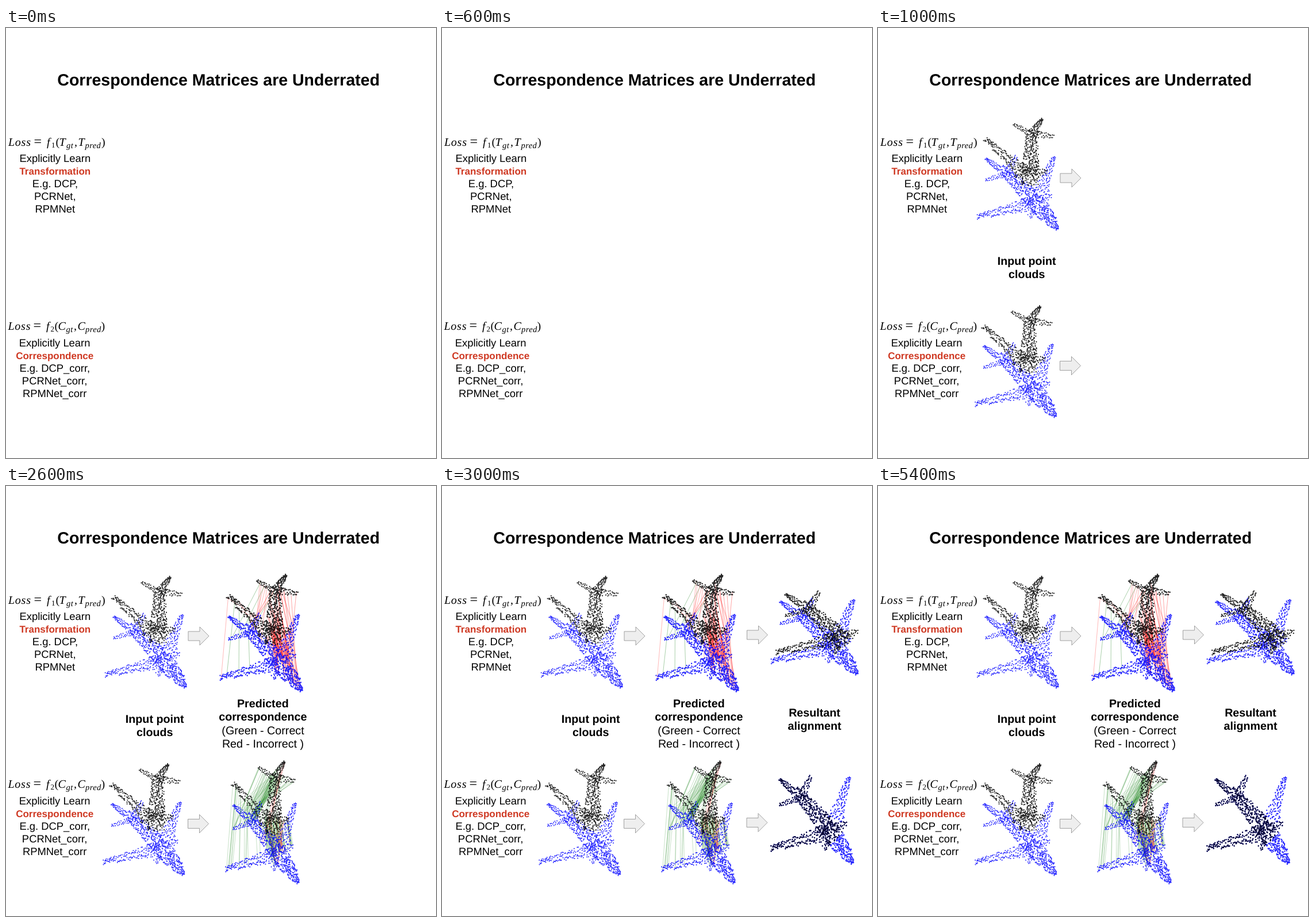
Recreate the animation shown at these times as an HTML page. Size 748 by 748 pixels, loop 7 s.

```html
<!DOCTYPE html>
<html lang="en">
<head>
<meta charset="utf-8">
<title>Correspondence Matrices are Underrated</title>
<style>
  html, body { margin: 0; height: 100%; overflow: hidden; background: #fff; }
  svg { display: block; width: 100vw; height: 100vh; }
  text {
    font-family: "Liberation Sans", Arial, sans-serif;
    font-size: 18.4px;
    text-anchor: middle;
    text-rendering: geometricPrecision;
  }
  .title { font-size: 28.5px; font-weight: bold; }
  .key { font-size: 17px; font-weight: bold; fill: #cf3a24; }
  .cap { font-size: 19.7px; }
  .b { font-weight: bold; }
  .math {
    font-family: "Liberation Serif", "Times New Roman", serif;
    font-size: 20px;
    font-style: italic;
    text-anchor: start;
  }
  .word { letter-spacing: .75px; }
  .sub { font-size: 14.5px; letter-spacing: .4px; }
  .up { font-style: normal; }
  .eq { font-size: 24px; font-style: normal; }
  .num { font-size: 13px; font-style: normal; }
  .arrow { fill: #eee; stroke: #8c8c8c; stroke-width: .8; }
  .dots { fill: none; stroke-linecap: round; stroke-opacity: .85; }
  .rays { fill: none; stroke-width: .8; }
  .stage { animation: 7s step-end infinite; }
  #inputs { animation-name: first; }
  #matches { animation-name: second; }
  #results { animation-name: third; }
  @keyframes first { 0% { opacity: 0 } 14.2857%, 100% { opacity: 1 } }
  @keyframes second { 0% { opacity: 0 } 28.5714%, 100% { opacity: 1 } }
  @keyframes third { 0% { opacity: 0 } 42.8571%, 100% { opacity: 1 } }
</style>
</head>
<body>
<svg viewBox="0 0 748 748">
  <defs><path id="arrow" class="arrow" d="M0 -8H20V-16L36 0L20 16V8H0Z"/></defs>

  <text class="title" x="369.7" y="99.5">Correspondence Matrices are Underrated</text>

  <text class="math" y="205">
    <tspan class="word" x="4">Loss</tspan><tspan class="eq" x="48.5">=</tspan>
    <tspan x="71">f</tspan><tspan class="num" x="79" dy="3">1</tspan>
    <tspan class="up" x="86.5" dy="-3">(</tspan><tspan x="92.5">T</tspan>
    <tspan class="sub" x="105" dy="3.5">gt</tspan><tspan class="up" x="119" dy="-3.5">,</tspan>
    <tspan x="125.5">T</tspan><tspan class="sub" x="137.5" dy="3.5">pred</tspan>
    <tspan class="up" x="166" dy="-3.5">)</tspan>
  </text>
  <text x="85.3" y="233.3">Explicitly Learn</text>
  <text class="key" x="85.3" y="255.2">Transformation</text>
  <text x="85.5" y="277.3">E.g. DCP,</text>
  <text x="85.3" y="299.2">PCRNet,</text>
  <text x="85.3" y="321">RPMNet</text>

  <text class="math" y="525">
    <tspan class="word" x="3.5">Loss</tspan><tspan class="eq" x="47.5">=</tspan>
    <tspan x="70">f</tspan><tspan class="num" x="77.5" dy="3">2</tspan>
    <tspan class="up" x="84.5" dy="-3">(</tspan><tspan x="90.5">C</tspan>
    <tspan class="sub" x="104.5" dy="3.5">gt</tspan><tspan class="up" x="118" dy="-3.5">,</tspan>
    <tspan x="124.5">C</tspan><tspan class="sub" x="138" dy="3.5">pred</tspan>
    <tspan class="up" x="165.5" dy="-3.5">)</tspan>
  </text>
  <text x="84.6" y="554.2">Explicitly Learn</text>
  <text class="key" x="84.7" y="576.1">Correspondence</text>
  <text x="84.8" y="598.2">E.g. DCP_corr,</text>
  <text x="84.6" y="620.1">PCRNet_corr,</text>
  <text x="84.6" y="641.8">RPMNet_corr</text>

  <g id="inputs" class="stage">
    <text class="cap b" x="258.7" y="411.7">Input point</text>
    <text class="cap b" x="258.7" y="435">clouds</text>
    <use href="#arrow" x="317" y="261"/>
    <use href="#arrow" x="316.5" y="587.5"/>
  </g>
  <g id="matches" class="stage">
    <text class="cap b" x="446.8" y="384.7">Predicted</text>
    <text class="cap b" x="446.8" y="408">correspondence</text>
    <text class="cap" x="447" y="431.7">(Green - Correct</text>
    <text class="cap" x="447" y="455">Red - Incorrect )</text>
  </g>
  <g id="results" class="stage">
    <text class="cap b" x="648" y="400.5">Resultant</text>
    <text class="cap b" x="648" y="423.8">alignment</text>
    <use href="#arrow" x="530.5" y="259"/>
    <use href="#arrow" x="530" y="585.5"/>
  </g>
</svg>
<script>
  // Joints of each plane; the black scan lacks the nose and the right wing.
  const blue = {
    tail: [187, 227], waist: [226, 253], hub: [269, 297], cut: [284, 315],
    chin: [301, 335], nose: [313, 350], finR: [240, 222], finL: [186, 265],
    rootL: [258, 308], wingL: [172, 329], podL: [264, 331],
    rootR: [283, 286], wingR: [306, 223], podR: [303, 294]
  };
  const black = {
    tail: [286, 158], waist: [268, 185], hub: [265, 248], cut: [264, 274],
    finR: [306, 188], finL: [235, 167], rootL: [248, 247], wingL: [186, 193],
    podL: [237, 257], podR: [294, 252]
  };

  // Tapered strips between joints: from, to, start width, end width, points.
  const strips = [
    ["waist", "tail", 20, 4, 75],
    ["hub", "waist", 31, 20, 210],
    ["hub", "cut", 31, 30, 95],
    ["cut", "chin", 30, 22, 115],
    ["chin", "nose", 22, 7, 55],
    ["waist", "finR", 16, 6, 36],
    ["waist", "finL", 13, 4, 36],
    ["rootL", "wingL", 23, 8, 125],
    ["rootR", "wingR", 28, 6, 105],
    ["hub", "podL", 16, 11, 34],
    ["hub", "podR", 16, 10, 36]
  ];

  let seed = 11;
  const rand = () => (seed = seed * 16807 % 2147483647) / 2147483647;

  // Even spread: stratified along the strip, golden-ratio steps across it.
  const points = {};
  for (const [from, to, w0, w1, n] of strips)
    points[to] = Array.from({ length: n }, (_, i) => {
      const u = ((i + rand()) / n) ** 1.2;
      const side = (i * .618 + rand() * .4) % 1 - .5;
      return { from, to, u, off: side * (w0 + (w1 - w0) * u) };
    });

  function at(plane, { from, to, u, off }) {
    const [x, y] = plane[from];
    const dx = plane[to][0] - x, dy = plane[to][1] - y, len = Math.hypot(dx, dy);
    return [x + dx * u + dy / len * off, y + dy * u - dx / len * off];
  }

  // A view puts the blue tail at (x, y) with its own scale.
  const view = (x, y, sx, sy) => p =>
    (x + (p[0] - 187) * sx).toFixed(1) + " " + (y + (p[1] - 227) * sy).toFixed(1);

  function draw(id, cls, d, style) {
    const path = document.createElementNS("http://www.w3.org/2000/svg", "path");
    path.setAttribute("class", cls);
    path.setAttribute("d", d);
    Object.assign(path.style, style);
    document.getElementById(id).append(path);
  }

  const shared = Object.keys(points).filter(to => black[to]);

  function cloud(id, plane, place, stroke, size, names = Object.keys(points)) {
    const dots = names.filter(to => plane[to])
      .flatMap(to => points[to].map(p => "M" + place(at(plane, p)) + "h0"));
    draw(id, "dots", dots.join(""), { stroke, strokeWidth: size });
  }

  const pick = list => list[Math.floor(rand() * list.length)];

  // Join n black points to blue ones; a strip paired with itself matches exactly.
  function rays(place, stroke, opacity, n, starts, ends) {
    let d = "";
    while (n--) {
      const p = pick(points[pick(starts)]);
      const q = ends ? pick(points[pick(ends)]) : p;
      d += "M" + place(at(black, p)) + "L" + place(at(blue, q));
    }
    draw("matches", "rays", d, { stroke, strokeOpacity: opacity });
  }

  const BLUE = "#00f", BLACK = "#000", RED = "#f22", GREEN = "#2c8a2c";

  for (const place of [view(187, 227, 1, 1), view(183.5, 553, 1, 1)]) {
    cloud("inputs", blue, place, BLUE, 2);
    cloud("inputs", black, place, BLACK, 2.2);
  }

  const wrong = view(387, 227, 1.015, 1.05);
  rays(wrong, RED, .5, 60, ["waist", "cut", "podR"], ["cut", "chin", "podR"]);
  rays(wrong, RED, .5, 16, ["waist", "finR", "tail"], ["nose", "wingR", "podR"]);
  rays(wrong, RED, .4, 16, ["wingL", "finL"], ["finR", "waist"]);
  rays(wrong, RED, .4, 2, ["wingL"]);
  rays(wrong, GREEN, .5, 6, ["finL", "wingL"]);
  cloud("matches", blue, wrong, BLUE, 2.4);
  cloud("matches", black, wrong, BLACK, 2.5);

  const right = view(395, 555, .905, 1.1);
  rays(right, GREEN, .33, 190, shared);
  rays(right, RED, .45, 16, ["cut", "podR"], ["cut", "podR"]);
  rays(right, RED, .4, 4, ["tail"], ["waist"]);
  cloud("matches", blue, right, BLUE, 2.1);
  cloud("matches", black, right, BLACK, 2.2);

  cloud("results", blue, view(588, 201, 1.07, 1.025), BLUE, 2.3);
  cloud("results", blue, view(597, 188, 1.1, 1), BLACK, 2.4, shared);
  const aligned = view(587, 510, 1.016, 1.187);
  cloud("results", blue, aligned, BLUE, 2.4);
  cloud("results", blue, aligned, "#00000c", 2.4, shared);
</script>
</body>
</html>
```
